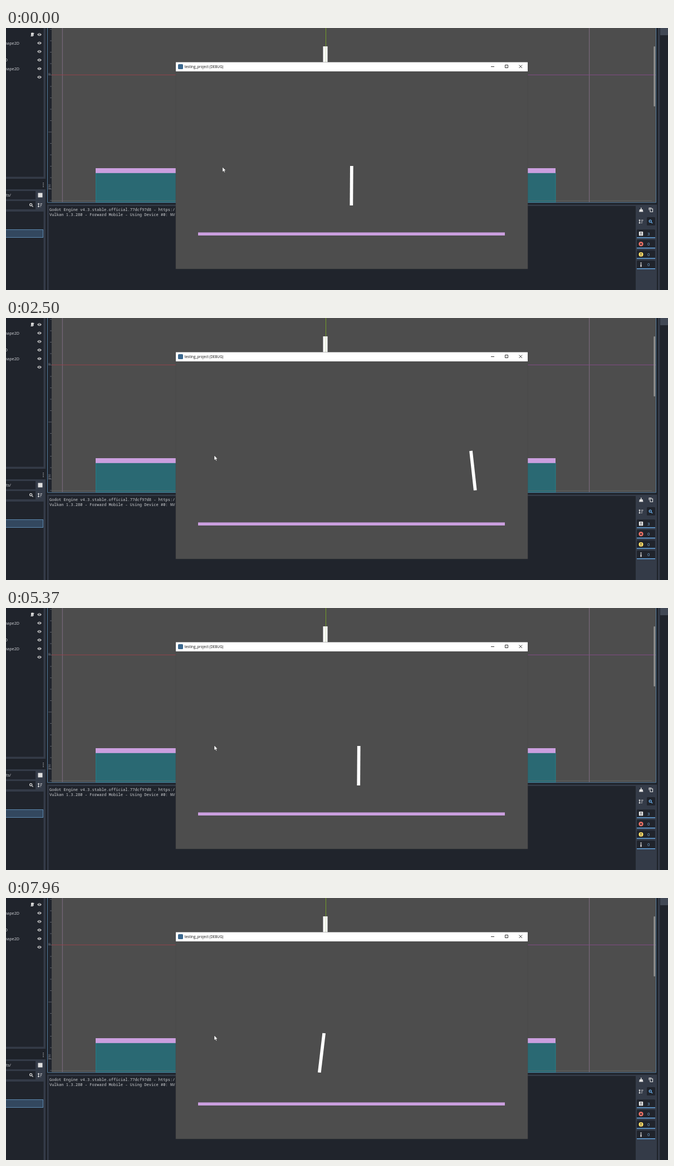
Recreate the animation shown at these times as an HTML page. Size 1189 px wide and 471 px high, loop 7.99 s.

```html
<!DOCTYPE html>
<html lang="en">
<head>
<meta charset="utf-8">
<title>Balancing bar</title>
<style>
html, body { margin: 0; width: 100%; height: 100%; overflow: hidden; background: #1e2229; }
svg { display: block; width: 1189px; height: 471px; }
text { font: 7.2px "Noto Sans", sans-serif; fill: #c9ccd1; }
.mono { font: 7.1px "Noto Sans Mono", monospace; fill: #cdcfd2; white-space: pre; }
.title { font: 6.3px "Open Sans", sans-serif; fill: #111; }
.ruler { font-size: 5.5px; fill: #8a8e96; }
.count { font-size: 7.6px; fill: #79a9d2; }
.line { fill: none; stroke: #e0e0e0; stroke-width: 1.1; }
.panel { fill: #343b48; }
.well { fill: #20242c; }
</style>
</head>
<body>
<svg viewBox="0 0 1189 471">
  <defs>
    <g id="eye">
      <path d="M-3.8 0Q0-5 3.8 0Q0 5-3.8 0Z" fill="#e0e0e0"/>
      <circle r="1.7" fill="#20242c"/><circle r=".8" fill="#e0e0e0"/>
    </g>
    <g id="lens" fill="none" stroke-width="1.2"><circle cx="-.8" cy="-.8" r="2"/><path d="M.8.8L3 3"/></g>
    <g id="sort" class="line"><path d="M-2.5-3V3M-3.8-1.8L-2.5-3.2L-1.2-1.8M-3.8 1.8L-2.5 3.2L-1.2 1.8M.5-2.5H4M.5 0H3M.5 2.5H2"/></g>
  </defs>

  <rect width="1189" height="471" fill="#1e2229"/>

  <!-- left docks -->
  <path class="panel" d="M0 0H71V271H0ZM0 290H71V471H0Z"/>
  <path class="well" d="M0 0H67.5V267.5H0ZM0 293H53V308H0ZM0 311H53V326H0ZM0 330H67.5V471H0Z"/>
  <rect x="-1" y="362.5" width="67.5" height="14" fill="#33485f" stroke="#5d8ab0"/>
  <g id="eyes"></g>
  <path d="M44.5 14.5H48V9.5H50.5M45.5 9H49V14H45.5Z" fill="#e0e0e0" stroke="#e0e0e0"/>
  <text x="24" y="29.5" text-anchor="end">Shape2D</text>
  <text x="3" y="60" text-anchor="end">2D</text>
  <text x="24" y="75.5" text-anchor="end">Shape2D</text>
  <path d="M67 278v1.5m0 1.7v1.5m0 1.7v1.5" stroke="#a5a8ad" stroke-width="1.5"/>
  <text x="9" y="303" text-anchor="end">ts/</text>
  <rect x="57.5" y="296.5" width="8" height="8" fill="#e0e0e0"/>
  <use href="#lens" x="45.5" y="318.5" stroke="#e0e0e0"/>
  <use href="#sort" x="61" y="318.5"/>

  <!-- scene view -->
  <rect x="75" width="1093" height="313.5" fill="#4d4d4d"/>
  <rect class="well" x="75" width="7" height="313.5"/>
  <g id="ticks" stroke="#777c84" stroke-width=".7"></g>
  <text class="ruler" transform="translate(80 84) rotate(-90)">0</text>
  <text class="ruler" transform="translate(80 290) rotate(-90)">250</text>
  <path d="M101.3 0V313M1047.7 0V313" stroke="#877389" stroke-width=".9"/>
  <path d="M82 84.3H305" stroke="#95424c"/>
  <path d="M937 84.3H1168" stroke="#844a88"/>
  <rect x="161.4" y="260.5" width="825.6" height="53" fill="#2a6973" stroke="#208791" stroke-width=".8"/>
  <rect x="161" y="252" width="826" height="8.8" fill="#cb9fdf"/>
  <rect x="569.5" y="33" width="8" height="29" fill="#fff"/>
  <path d="M574.5 0V33" stroke="#729d25"/>
  <path d="M574.5 33V62" stroke="#b9c99a" stroke-width=".7"/>
  <rect x="1163.3" y="33" width="2.7" height="108" rx="1" fill="#929292"/>
  <path d="M82 310.5H1160" stroke="#777" stroke-opacity=".45"/>
  <path d="M74.5 0V313.8H1167.5V0" fill="none" stroke="#527b9d"/>

  <!-- output panel -->
  <rect class="panel" x="74" y="317.5" width="1095" height="153.5"/>
  <rect class="well" x="76.5" y="320" width="1054.5" height="151"/>
  <text class="mono" x="78" y="329">Godot Engine v4.3.stable.official.77dcf97d8 - https:/</text>
  <text class="mono" x="78" y="338">Vulkan 1.3.280 - Forward Mobile - Using Device #0: NV</text>
  <path d="M1140 323h1.5v3h2l1 4.5h-7.5l1-4.5h2z" fill="#e0e0e0"/>
  <path class="line" d="M1155 327.5V323.5H1159.5M1157 325H1161.5V330.5H1157Z"/>
  <use href="#sort" x="1140.5" y="348"/>
  <rect class="well" x="1151" y="340" width="15" height="15" rx="1.5"/>
  <use href="#lens" x="1158" y="348" stroke="#70bafa"/>
  <g id="badges"></g>
  <rect class="panel" x="1171" width="3.5" height="471"/>
  <rect class="well" x="1174.5" width="14.5" height="471"/>
  <rect x="1175" width="14" height="13" fill="#414855"/>

  <!-- game window -->
  <rect x="305" y="61.5" width="632" height="371.5" fill="#4d4d4d" stroke="#444" stroke-width=".5"/>
  <rect x="305" y="61.5" width="632" height="16.5" fill="#fff"/>
  <rect x="309" y="65" width="9" height="9" rx="1.5" fill="#3b688f"/>
  <text class="title" x="320.5" y="71.7">testing_project (DEBUG)</text>
  <path d="M871 69.5H877M896.5 66.5H901.5V71.5H896.5ZM921.5 66.5L927 72M927 66.5L921.5 72" fill="none" stroke="#222" stroke-width=".9"/>
  <rect x="345" y="367.5" width="551" height="5.5" fill="#cb9fdf"/>
  <rect id="bar" x="-2.85" y="-35.6" width="5.7" height="71.2" fill="#fff"/>
  <path id="cursor" d="M0 0V8.8L2 7L3.4 10L4.8 9.4L3.5 6.4H6.2Z" fill="#fff" stroke="#222" stroke-width=".5"/>
</svg>
<script>
const LOOP = 7990, REST_X = 620.6, REST_Y = 283.5;
const RAMP = 110;    // ms to reach full speed, and to stop
const STRIDE = 330;  // ms per hop
const el = id => document.getElementById(id);
const repeat = (n, part) => Array.from({ length: n }, (_, i) => part(i)).join('');

el('eyes').innerHTML = repeat(6, i => `<use href="#eye" x="60" y="${11.7 + i * 15.3}"/>`);
el('ticks').innerHTML = repeat(16, i => `<path d="M${i % 5 === 4 ? 76 : 79} ${2.5 + i * 20.5}H82"/>`);

const bang = '<path d="M0-2.5V.6M0 1.6V2.8" stroke="#20242c" stroke-width="1.3"/>';
const icons = [
  `<rect x="-3.7" y="-3.7" width="7.4" height="7.4" rx="1" fill="#e0e0e0"/>${bang}`,
  '<circle r="4" fill="#ff786b"/><path d="M-1.7-1.7L1.7 1.7M1.7-1.7L-1.7 1.7" stroke="#20242c" stroke-width="1.1"/>',
  `<circle r="4" fill="#ffde66"/>${bang}`,
  '<path d="M0-4V-2M0-1V4" stroke="#e0e0e0" stroke-width="2"/>'
];
el('badges').innerHTML = repeat(icons.length, i => `
  <g transform="translate(1133 ${369.7 + i * 18.6})">
    <rect class="well" y="-7.5" width="33" height="15" rx="1.5"/>
    <rect y="6.6" width="33" height="1.3" fill="#70bafa"/>
    <g transform="translate(7.5)">${icons[i]}</g>
    <text class="count" x="19" y="2.8">${i ? 0 : 3}</text>
  </g>`);

// each run: key down, key up, where the bar ends
const runs = [
  [770, 2223, 850], [2380, 3486, 682.5], [4080, 4450, 634.5],
  [4620, 4790, 645], [5010, 5180, 633.5], [5640, 5920, 603],
  [6118, 6300, 577], [6430, 6790, 525], [7710, 8100, 585]
];

// share of the way covered and of full speed, for a ramp up, a cruise and a ramp down
function cruise(age, span) {
  const ramp = Math.min(RAMP, span / 2), left = span - age, full = span - ramp;
  const way = age < ramp ? age * age / (2 * ramp)
    : left < ramp ? full - left * left / (2 * ramp)
    : age - ramp / 2;
  return { way: way / full, drive: Math.min(1, age / ramp, left / ramp) };
}

function poseAt(t) {
  let x = REST_X;
  for (const [from, to, end] of runs) {
    if (t <= from) break;
    if (t < to) {
      const { way, drive } = cruise(t - from, to - from);
      const swing = Math.sin(Math.PI * (t - from) / STRIDE);
      return {
        x: x + (end - x) * way,
        lift: 11 * swing * swing * drive,
        lean: Math.sign(end - x) * (8.2 - 2.1 * swing) * drive
      };
    }
    x = end;
  }
  return { x, lift: 0, lean: .4 };
}

function draw(t) {
  const { x, lift, lean } = poseAt(t);
  el('bar').setAttribute('transform', `translate(${x} ${REST_Y - lift}) rotate(${lean})`);
  const rest = Math.max(0, 1 - t / 180) ** 2;
  el('cursor').setAttribute('transform', `translate(${374 + 15 * rest} ${247 + 3 * rest})`);
}

const start = performance.now();
function tick() {
  draw((performance.now() - start) % LOOP);
  requestAnimationFrame(tick);
}
draw(0);
requestAnimationFrame(tick);
</script>
</body>
</html>
```
